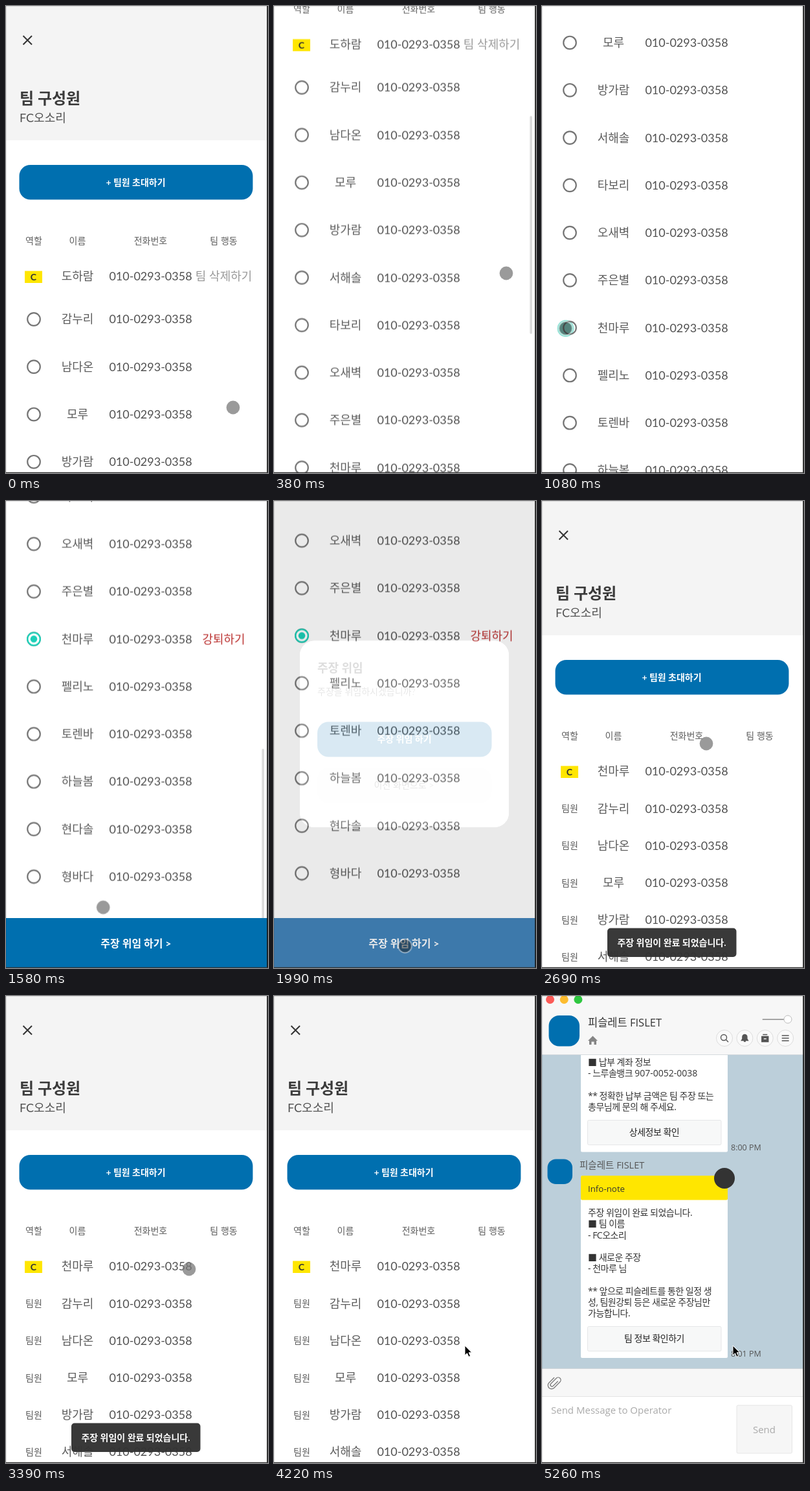
Recreate the animation shown at these times as an HTML page. Size 405 px wide and 720 px high, loop 5.32 s.

```html
<!DOCTYPE html>
<html lang="ko">
<head>
<meta charset="utf-8">
<title>팀 구성원</title>
<style>
html, body { margin: 0; width: 100%; height: 100%; overflow: hidden; background: #fff; }
svg { display: block; width: 100%; height: 100%; }
text { font-family: Lato, "Noto Sans CJK KR", "Noto Sans KR", sans-serif; fill: #505050; white-space: pre; }
#chat text { font-family: "Open Sans", "Noto Sans CJK KR", "Noto Sans KR", sans-serif; }
#chat .ko { letter-spacing: -.5px; }
#chat .num { letter-spacing: 0; }
.thin { font-weight: 350; fill: #5c5c5c; }
.bold { font-weight: 700; }
.ring { fill: none; stroke: #757575; stroke-width: 2.2; }

.a { animation: 5320ms linear infinite; }
#list { animation-name: scroll; }
#thumb { animation-name: thumb, thumbFade; }
#ripple { animation-name: ripple; transform-box: fill-box; transform-origin: center; }
#picked, #bar { animation-name: picked; }
#lit { animation-name: lit; }
#dialog { animation-name: dialog; }
#done { animation-name: done; }
#toast { animation-name: toast; }
#chat { animation-name: chat; }
#dot { animation-name: move, dotHide; }
#press { animation-name: press; }
#arrow { animation-name: move, arrowShow; }

@keyframes scroll {
  0%, .38% { transform: translateY(0); animation-timing-function: cubic-bezier(.4, .1, .8, .8); }
  7.14% { transform: translateY(-356.2px); animation-timing-function: cubic-bezier(.2, .35, .4, 1); }
  14.1%, 22.5% { transform: translateY(-573px); animation-timing-function: cubic-bezier(.4, 0, .3, 1); }
  31%, 100% { transform: translateY(-861.5px); }
}
@keyframes thumb {
  0%, .38% { transform: translateY(0); animation-timing-function: cubic-bezier(.4, .1, .8, .8); }
  7.14% { transform: translateY(169px); animation-timing-function: cubic-bezier(.2, .35, .4, 1); }
  14.1%, 22.5% { transform: translateY(271px); animation-timing-function: cubic-bezier(.4, 0, .3, 1); }
  31%, 100% { transform: translateY(384px); }
}
@keyframes thumbFade {
  0%, .38% { opacity: 0; }
  1.5%, 15% { opacity: 1; }
  18%, 22.5% { opacity: 0; }
  23.5%, 31% { opacity: 1; }
  34%, 100% { opacity: 0; }
}
@keyframes ripple {
  0%, 19.2% { transform: scale(.3); opacity: 0; }
  19.3% { transform: scale(.4); opacity: .6; }
  20.3% { transform: scale(1); opacity: .6; }
  23.5%, 100% { transform: scale(1.5); opacity: 0; }
}
@keyframes picked {
  0%, 21% { opacity: 0; }
  21.01%, 100% { opacity: 1; }
}
@keyframes lit {
  0%, 35.8% { opacity: 0; }
  37%, 39% { opacity: 1; }
  41%, 100% { opacity: 0; }
}
@keyframes dialog {
  0%, 36.8% { opacity: 0; }
  40.98%, 100% { opacity: 1; }
}
@keyframes done {
  0%, 47% { opacity: 0; }
  47.01%, 100% { opacity: 1; }
}
@keyframes toast {
  0%, 48.5% { opacity: 0; }
  50.2%, 73% { opacity: 1; }
  77%, 100% { opacity: 0; }
}
@keyframes chat {
  0%, 79.5% { opacity: 0; }
  85.5%, 100% { opacity: 1; }
}
@keyframes move {
  0%, .38% { transform: translate(351px, 619px); animation-timing-function: ease-in-out; }
  4.9%, 8% { transform: translate(359px, 412px); animation-timing-function: ease-in-out; }
  17%, 23% { transform: translate(36.5px, 497px); animation-timing-function: ease-in-out; }
  34%, 39% { transform: translate(202.5px, 686px); animation-timing-function: ease-in-out; }
  43.5%, 47% { transform: translate(202px, 368px); animation-timing-function: ease-in-out; }
  50.5%, 52.5% { transform: translate(254px, 374px); animation-timing-function: ease-in-out; }
  57% { transform: translate(335px, 396px); animation-timing-function: ease-in-out; }
  62.5%, 69% { transform: translate(283px, 421px); animation-timing-function: ease-in-out; }
  78%, 100% { transform: translate(295px, 539px); }
}
@keyframes press {
  0%, 19.1%, 21.5%, 36%, 38.5%, 44.4%, 46.5%, 100% {
    fill: rgba(120, 120, 120, .75); stroke: rgba(255, 255, 255, 0);
  }
  19.2%, 21.4%, 36.1%, 38.4%, 44.5%, 46.4% {
    fill: rgba(10, 16, 16, .45); stroke: rgba(255, 255, 255, .45);
  }
}
@keyframes dotHide {
  0%, 73.5% { opacity: 1; }
  73.51%, 100% { opacity: 0; }
}
@keyframes arrowShow {
  0%, 73.5% { opacity: 0; }
  73.51%, 100% { opacity: 1; }
}
</style>
</head>
<body>
<svg id="stage" viewBox="0 0 405 720" preserveAspectRatio="none"></svg>
<script>
const BLUE = '#006faf';
const TEAL = '#1cd0b8';
const PHONE = '010-0293-0358';
const TEAM = 'FC오소리';
const BRAND = '피슬레트 FISLET';
const CAPTAIN = '도하람';
const HEIR = 8;
const names = ['감누리', '남다온', '모루', '방가람', '서해솔', '타보리', '오새벽',
  '주은별', '천마루', '펠리노', '토렌바', '하늘봄', '현다솔', '형바다'];

// y is the visual middle of the line
const text = (x, y, size, str, { cls = '', fill = '', anchor = 'middle' } = {}) =>
  `<text x="${x}" y="${y + size * .36}" font-size="${size}" class="${cls}" text-anchor="${anchor}"` +
  `${fill && ` style="fill:${fill}"`}>${str}</text>`;
const left = (x, y, size, str, opt) => text(x, y, size, str, { ...opt, anchor: 'start' });
const box = (x, y, w, h, fill, r = 0, more = '') =>
  `<rect x="${x}" y="${y}" width="${w}" height="${h}" rx="${r}" fill="${fill}" ${more}/>`;
const disc = (x, y, r, fill, more = '') => `<circle cx="${x}" cy="${y}" r="${r}" fill="${fill}" ${more}/>`;
const layer = (id, body) => `<g id="${id}" class="a">${body}</g>`;

const person = (y, name) =>
  text(110.5, y, 18, name, { cls: 'thin' }) + text(223.5, y, 18, PHONE);

const radio = y => `<circle class="ring" cx="43" cy="${y}" r="9.8"/>`;

const head = captain =>
  box(0, 0, 405, 207, '#f4f4f4') +
  '<path d="M26.5 46L40 59.500M40 46L26.500 59.500" stroke="#333" stroke-width="2"/>' +
  left(21, 142, 24, '팀 구성원', { cls: 'bold', fill: '#3a3a3a' }) +
  left(21, 173, 18, TEAM) +
  box(20.5, 245, 361, 53.5, BLUE, 17) +
  text(200.5, 272, 14, '+ 팀원 초대하기', { cls: 'bold', fill: '#fff' }) +
  [[43, '역할'], [110.5, '이름'], [223.5, '전화번호'], [336.5, '팀 행동']]
    .map(([x, s]) => text(x, 362, 14, s, { cls: 'thin' })).join('') +
  box(29, 408.5, 27, 18.5, '#ffe600') +
  text(42.5, 417.5, 14, 'C', { cls: 'bold', fill: '#333' }) +
  person(417, captain);

const rowY = i => 483 + 73.27 * i;
const heirY = rowY(HEIR);

const list =
  head(CAPTAIN) +
  text(336.5, 417, 18, '팀 삭제하기', { cls: 'thin', fill: '#999' }) +
  disc(36.5, heirY + 1, 13, '#45cdb8', 'id="ripple" class="a"') +
  names.map((n, i) => radio(rowY(i)) + person(rowY(i), n)).join('') +
  layer('picked',
    disc(43, heirY, 9.8, '#fff', `stroke="${TEAL}" stroke-width="2.4"`) +
    disc(43, heirY, 5.3, TEAL) +
    text(336.5, heirY, 18, '강퇴하기', { cls: 'thin', fill: '#ba2f2e' }));

const bar =
  box(0, 643, 405, 77, BLUE) +
  box(0, 643, 405, 77, '#4384bb', 0, 'id="lit" class="a"') +
  text(201, 682, 16, '주장 위임 하기 &gt;', { cls: 'bold', fill: '#fff' });

// the shade leaves the card area clear
const dialog =
  '<path fill="#000" fill-opacity=".54" fill-rule="evenodd" d="M0 0H405V720H0Z' +
  'M62 215.500H341a22 22 0 0 1 22 22V481a22 22 0 0 1-22 22H62a22 22 0 0 1-22-22V237.500a22 22 0 0 1 22-22Z"/>' +
  box(40, 215.5, 323, 287.5, '#fff', 22) +
  left(67, 258, 18, '주장 위임', { cls: 'bold', fill: '#222' }) +
  left(67, 294, 14, '주장을 위임하시겠습니까?', { cls: 'thin' }) +
  box(67, 340.5, 269.5, 54, BLUE, 17) +
  text(201.5, 367, 14, '주장 위임 하기', { cls: 'bold', fill: '#fff' }) +
  box(67, 411.5, 269.5, 54, '#f4f4f4', 17) +
  text(201, 438, 14, '이전 화면으로 &gt;', { cls: 'thin' });

const done =
  box(0, 0, 405, 720, '#fff') + head(names[HEIR]) +
  names.slice(0, 5).map((n, i) => {
    const y = 474.3 + 57.15 * i;
    return text(43, y, 14, '팀원', { cls: 'thin' }) + person(y, n);
  }).join('');

const toast =
  box(101, 658.5, 199.5, 44.5, '#333', 5, 'fill-opacity=".97"') +
  text(200.5, 681, 14, '주장 위임이 완료 되었습니다.', { cls: 'bold', fill: '#fff' });

const lines = (y, rows) => rows.map((s, i) =>
  s && left(71, y + 17.25 * i, 14, s, { cls: 'ko', fill: '#333' })).join('');
const chatButton = (y, s) =>
  box(70.5, y, 206.5, 38, '#f7f8f8', 2, 'stroke="#e6e7e8"') +
  text(173.5, y + 18.5, 14, s, { cls: 'ko', fill: '#222' });

const icons = [
  '<circle cx="-1" cy="-1" r="4.500"/><path d="M2.300 2.300L6 6"/>',
  '<path fill="#555" d="M-5 3.500L-3.500 1V-2a3.500 3.500 0 0 1 7 0V1L5 3.500ZM-1.500 5h3"/>',
  '<path fill="#555" d="M-5-2.500H5V5.500H-5ZM-3.500-5.500H3.500"/><path stroke="#fff" d="M-2 1H2"/>',
  '<path d="M-5.500-4H5.500M-5.500 0H5.500M-5.500 4H5.500"/>',
].map((d, i) => `<g transform="translate(${282 + 31.4 * i} 65)">` +
  disc(0, 0, 12.5, '#fafafa', 'stroke="#ddd"') +
  `<g fill="none" stroke="#555" stroke-width="1.400">${d}</g></g>`).join('');

const chat =
  box(0, 0, 405, 720, '#bccfda') +
  // older message
  box(60, 80, 227, 160.5, '#fff', 2) +
  lines(102, ['■ 납부 계좌 정보', '- 느루솔뱅크 <tspan class="num">907-0052-0038</tspan>', '',
    '** 정확한 납부 금액은 팀 주장 또는', '총무님께 문의 해 주세요.']) +
  chatButton(191.5, '상세정보 확인') +
  left(292, 233, 12.5, '8:00 PM', { fill: '#555' }) +
  // newest message
  box(8.5, 251.5, 38.5, 38.5, BLUE, 13) +
  left(58, 261, 14.5, BRAND, { fill: '#555' }) +
  box(60, 277, 227, 281, '#fff', 2) +
  box(60, 277, 227, 37.5, '#ffe600', 2) +
  left(71, 297, 13.3, 'Info-note', { fill: '#333' }) +
  disc(282, 281, 16, '#333') +
  lines(334, ['주장 위임이 완료 되었습니다.', '■ 팀 이름', '- ' + TEAM, '', '■ 새로운 주장',
    `- ${names[HEIR]} 님`, '', '** 앞으로 피슬레트를 통한 일정 생',
    '성, 팀원강퇴 등은 새로운 주장님만', '가능합니다.']) +
  chatButton(509.5, '팀 정보 확인하기') +
  left(292, 551, 12.5, '8:01 PM', { fill: '#555' }) +
  // top bar
  box(0, 0, 405, 90, '#f7f7f7') + box(0, 90, 405, 1, '#d5dade') +
  ['#fc5b57', '#fdbc2f', '#2fc740'].map((c, i) => disc(12.5 + 21.7 * i, 5.5, 6.5, c)).join('') +
  box(10.5, 30, 47.5, 47.5, BLUE, 16) +
  left(71, 41, 16.5, BRAND, { fill: '#333' }) +
  '<path fill="#858585" d="M71 69L78.500 61.500L86 69H84V75H80.500V70.500H76.500V75H73V69Z"/>' +
  box(340.5, 35.2, 34, 1.8, '#999', 1) +
  disc(380, 36, 6, '#fff', 'stroke="#bbb"') + icons +
  // message entry
  box(0, 574.5, 405, 43, '#f7f7f7') + box(0, 574, 405, 1, '#d0d6da') +
  '<path fill="none" stroke="#808080" stroke-width="1.400" stroke-linecap="round" ' +
  'transform="translate(19 596) rotate(45)" d="M2.500-5V5a2.500 2.500 0 0 1-5 0V-7a4 4 0 0 1 8 0V6a5.500 5.500 0 0 1-11 0V-5"/>' +
  box(0, 617, 405, 103, '#fff') + box(0, 617, 405, 1, '#e4e4e4') +
  left(14, 639, 15, 'Send Message to Operator', { fill: '#aaa' }) +
  box(301, 631, 85.5, 74, '#f6f6f6', 2, 'stroke="#e6e6e6"') +
  text(343.5, 669, 15, 'Send', { fill: '#aaa' });

const dot = disc(0, 0, 10.4, '#787878', 'id="press" class="a" stroke-width="2"');

const arrow = '<path d="M0 0V15L3.500 11.800L6 17.300L8.600 16.200L6.200 10.800H10.800Z" fill="#000" stroke="#fff" stroke-width="1"/>';

const edges =
  box(0, 0, 405, 1, 'rgba(0,0,0,.1)') + box(0, 0, 1, 720, 'rgba(0,0,0,.08)') +
  box(403.3, 0, 1.7, 720, '#1a1a1a') + box(0, 718.8, 405, 1.2, '#333');

document.getElementById('stage').innerHTML =
  box(0, 0, 405, 720, '#fff') +
  layer('list', list) +
  box(395.5, 0, 3.5, 336, '#dadada', 1.7, 'id="thumb" class="a"') +
  layer('bar', bar) +
  layer('dialog', dialog) +
  layer('done', done) +
  layer('toast', toast) +
  layer('chat', chat) +
  edges +
  layer('dot', dot) +
  layer('arrow', arrow);
</script>
</body>
</html>
```
